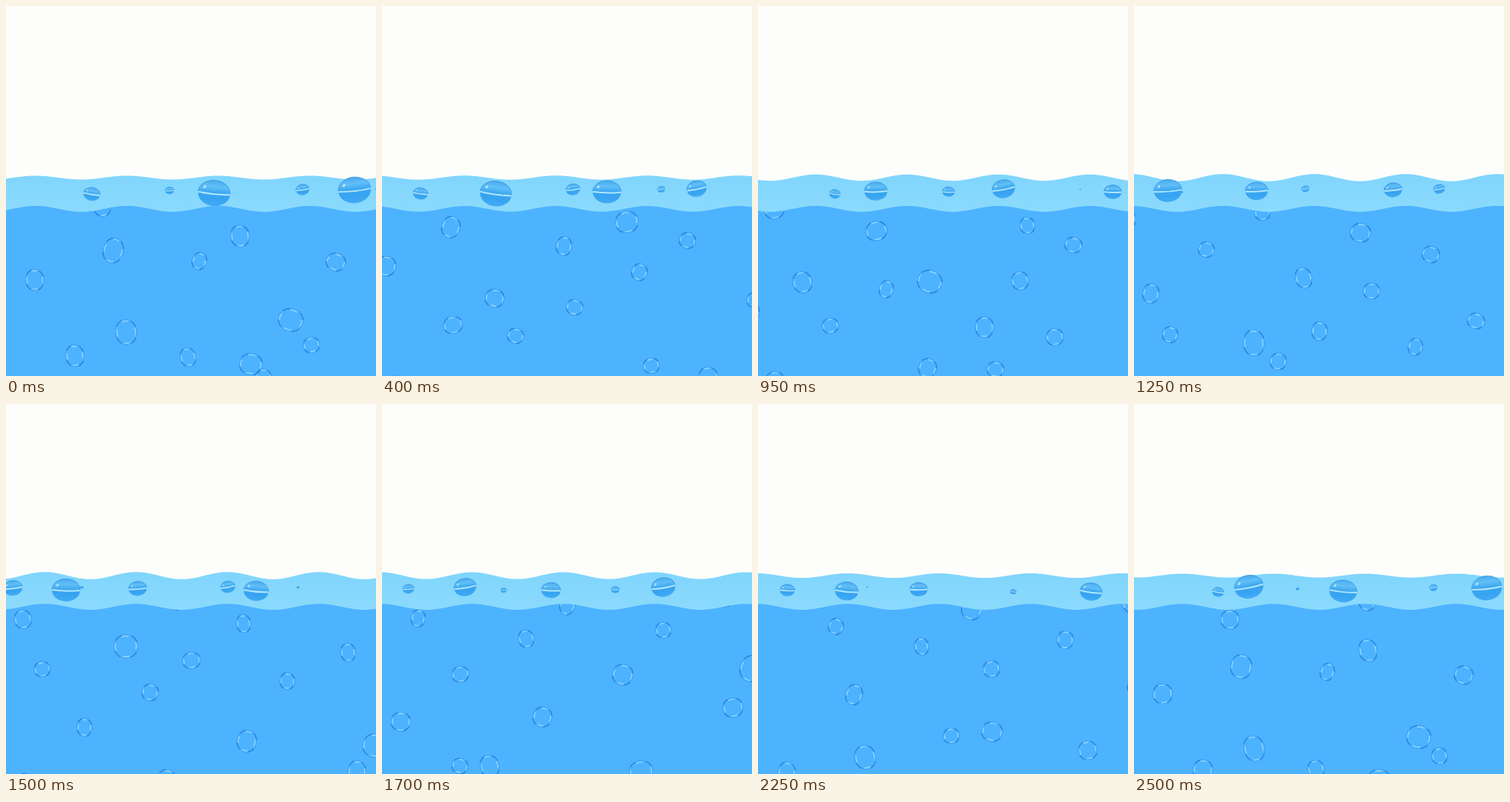
Write an HTML page with a canvas that moves like this. It is 498x498 px and loops after 2550 ms.

```html
<!DOCTYPE html>
<html lang="en">
<head>
<meta charset="utf-8">
<title>Bubbles</title>
<style>
  html, body { margin: 0; width: 100%; height: 100%; overflow: hidden; background: #fdfefc; }
  canvas { display: block; }
</style>
</head>
<body>
<canvas id="stage" width="498" height="498"></canvas>
<script>
const SIZE = 498, LOOP = 2550, STEP = 50, STEPS = LOOP / STEP;
const WAVELENGTH = 123, TAU = 2 * Math.PI;
const BUBBLES = 58, SURFACE = 275, RISE = 1.55;
const DOME_START = 1.2, DOME_END = 6.7, CENTER = 220;
const ctx = document.getElementById('stage').getContext('2d');

let seed = 17;
function random() {
  seed = (seed * 16807) % 2147483647;
  return seed / 2147483647;
}

// Bubbles reach the surface one after another, spread evenly over the loop and the width
const bubbles = Array.from({ length: BUBBLES }, (_, i) => ({
  x: (i * 0.618 + 0.12 * random()) % 1 * (SIZE + 30) - 15,
  r: 11 + 6 * random() ** 2,
  arrival: (i + random()) * STEPS / BUBBLES,
  tilt: random() * 2 - 1
}));

// Both waves run left five wavelengths per loop, slower at first
const drift = [[0, 40], [400, -12], [650, -87], [1700, -371], [2500, -550], [LOOP, 40 - 5 * WAVELENGTH]];

function waveShift(t) {
  const i = Math.max(1, drift.findIndex(([time]) => time >= t));
  const [t0, a] = drift[i - 1], [t1, b] = drift[i];
  return a + (b - a) * (t - t0) / (t1 - t0);
}

function waterPath(level, height, shift) {
  ctx.beginPath();
  ctx.moveTo(0, SIZE);
  for (let x = 0; x <= SIZE; x += 2) {
    ctx.lineTo(x, level - height * Math.cos(TAU * (x - shift) / WAVELENGTH));
  }
  ctx.lineTo(SIZE, SIZE);
  ctx.closePath();
}

function vertical(top, bottom, ...colors) {
  const shade = ctx.createLinearGradient(0, top, 0, bottom);
  colors.forEach((color, i) => shade.addColorStop(i / (colors.length - 1), color));
  return shade;
}

function arc(rx, ry, from, to, color, width) {
  ctx.beginPath();
  ctx.ellipse(0, 0, rx, ry, 0, from, to);
  ctx.strokeStyle = color;
  ctx.lineWidth = width;
  ctx.stroke();
}

function ring({ x, r, tilt }, y, age) {
  const wobble = 0.08 * Math.sin(x + age * 0.8);
  const rx = r * (0.94 + wobble), ry = r * (1 - wobble);
  ctx.save();
  ctx.translate(x, y);
  ctx.rotate(0.3 * Math.sin(tilt * 3 + age * 0.5));
  arc(rx, ry, 0, TAU, 'rgba(45,130,222,.3)', 1.2);
  // Dark and bright glints alternate around the rim
  for (let i = 0; i < 4; i++) {
    const angle = 0.6 + i * TAU / 4;
    arc(rx, ry, angle, angle + 0.7, 'rgba(34,126,216,.75)', 1.6);
    arc(rx - 1.8, ry - 1.8, angle - 0.9, angle - 0.2, 'rgba(175,230,255,.75)', 1.3);
  }
  ctx.restore();
}

function dome({ x, r, tilt }, age) {
  const rx = r * Math.min(1.35, (age - DOME_START) / 3.3), ry = rx * 0.8;
  ctx.save();
  ctx.translate(CENTER + (x - CENTER) * (1 - 0.02 * age), 250 + 4 * tilt);
  ctx.rotate(0.2 * tilt);
  ctx.beginPath();
  ctx.ellipse(0, 0, rx, ry, 0, 0, TAU);
  ctx.fillStyle = vertical(-ry, ry, '#48a9ee', '#62bff6', '#38a4f1', '#38a4f1', '#43abf5');
  ctx.fill();
  if (rx > 3) {
    arc(rx, ry, Math.PI, TAU, 'rgba(48,146,226,.7)', 1);
    ctx.beginPath();
    ctx.moveTo(-rx, 0);
    ctx.quadraticCurveTo(0, rx * 0.12, rx, 0);
    ctx.strokeStyle = '#b0e6fd';
    ctx.lineWidth = Math.min(2, rx / 6);
    ctx.stroke();
    arc(rx * 0.75, ry * 0.75, 3.6, 3.9, 'rgba(205,240,255,.8)', rx / 8);
  }
  ctx.restore();
}

function draw(t) {
  const shift = waveShift(t);
  const backHeight = 3.7 - 1.2 * Math.cos(TAU * (t / LOOP - 0.05));
  const frontHeight = 4 - 2.8 * Math.exp(-(((t - 650) / 150) ** 2));

  // Steps since each bubble met the surface, negative while it rises
  const ages = bubbles.map(b => (t / STEP - b.arrival + 1.5 * STEPS) % STEPS - STEPS / 2);

  ctx.fillStyle = '#fdfefc';
  ctx.fillRect(0, 0, SIZE, SIZE);
  waterPath(231, backHeight, shift);
  ctx.fillStyle = vertical(228, 275, '#80d5fd', '#8bdafc');
  ctx.fill();

  bubbles.forEach((bubble, i) => {
    if (ages[i] > DOME_START && ages[i] < DOME_END) dome(bubble, ages[i]);
  });

  ctx.save();
  waterPath(273, frontHeight, shift);
  ctx.fillStyle = '#4db3ff';
  ctx.fill();
  ctx.clip();
  bubbles.forEach((bubble, i) => {
    const y = SURFACE - RISE * bubble.r * ages[i];
    if (y > 250 && y < SIZE + 20) ring(bubble, y, ages[i]);
  });
  ctx.restore();
}

function tick() {
  draw(Math.floor(performance.now() % LOOP / STEP) * STEP);
  requestAnimationFrame(tick);
}
tick();
</script>
</body>
</html>
```
